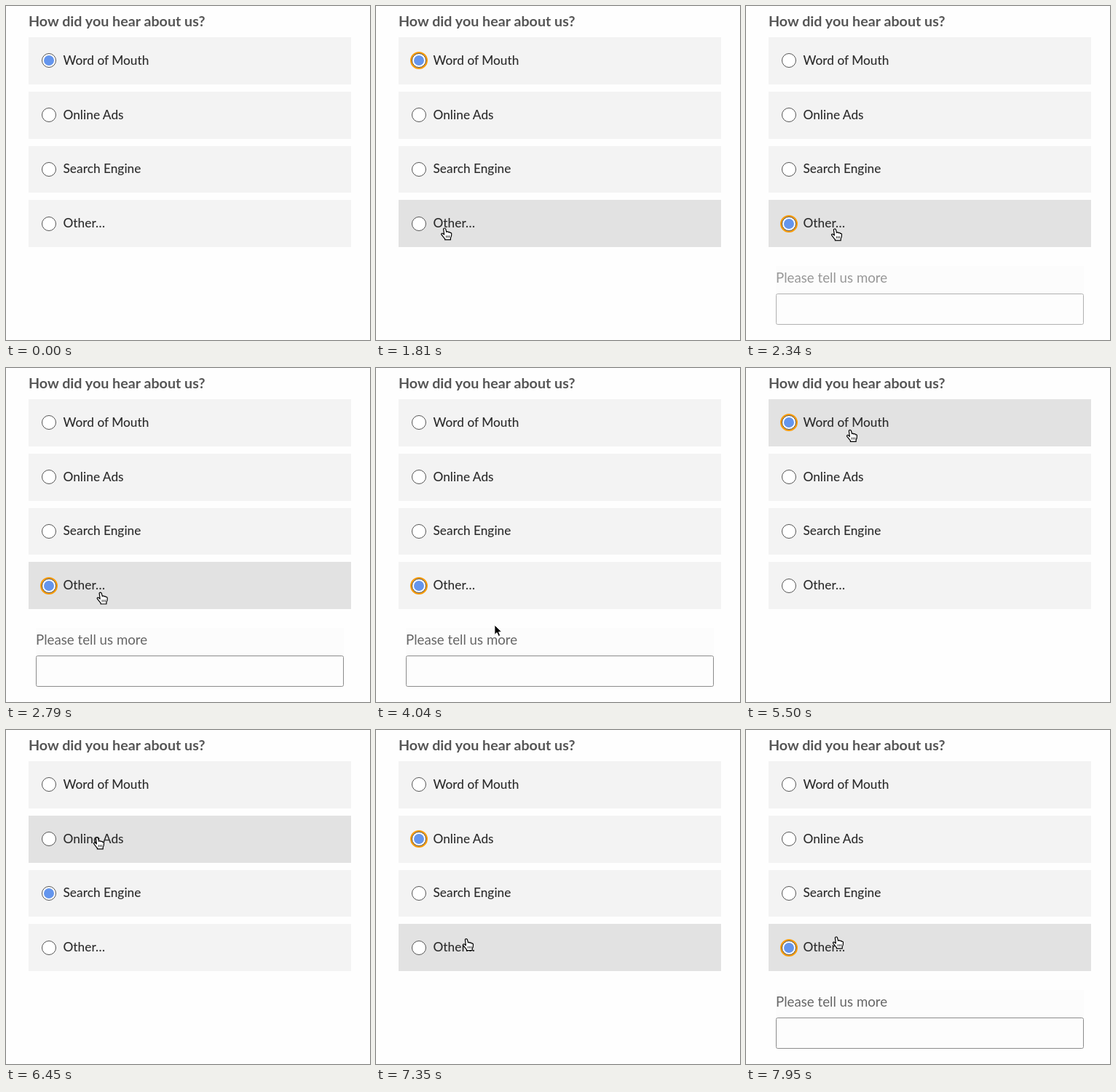
An HTML page that plays this animation: 500 px wide and 460 px high, repeating every 8000 ms.

```html
<!DOCTYPE html>
<html lang="en">
<head>
<meta charset="utf-8">
<title>Survey question</title>
<style>
  html, body { margin: 0; width: 100%; height: 100%; overflow: hidden; background: #fefefe; }
  svg { display: block; width: 500px; height: 460px; font-family: Lato, "Open Sans", sans-serif; }
  .title { font-size: 19.7px; font-weight: 700; fill: #555; }
  .option { font-size: 17.3px; font-weight: 500; fill: #2d2d2d; }
  .label { font-size: 18.7px; fill: #666; }
</style>
</head>
<body>
<svg viewBox="0 0 500 460">
  <text class="title" x="31" y="28">How did you hear about us?</text>
  <g id="options"></g>
  <g id="panel">
    <rect x="41" y="358" width="423" height="81" fill="#fcfcfc"/>
    <text class="label" x="41" y="381">Please tell us more</text>
    <rect x="41.5" y="396.5" width="422" height="42" rx="2" fill="#fdfdfd" stroke="#8c8c8c"/>
  </g>
  <g id="cursor" stroke-linejoin="round">
    <path id="arrow" d="M0 0V13.5L3.2 10.6 5.4 15.6 7.8 14.6 5.7 9.8H10Z" fill="#000" stroke="#fff"/>
    <g id="hand" stroke="#000" stroke-width="1.2" transform="translate(0 -.7)">
      <path fill="#fff" d="M-1.6 1.8C-1.4 .4 1 .2 1.5 1.8L2.6 6C3.2 5 5 5.2 5.2 6.4 6 5.6 7.4 6 7.6 7.2 8.6 6.6 9.6 7.4 9.5 8.6 9.6 11 9 13 8.2 14.2V16.6H.4V15.2C-1.4 13.6-2.8 11-4.4 9.4-5 8.2-3.4 7.2-2.2 8.2L-.6 9.6Z"/>
      <path fill="none" stroke-width=".8" d="M2.4 10.8v3M4.5 10.8v3M6.6 10.8v3"/>
    </g>
  </g>
</svg>
<script>
const LOOP = 8000, ENTER = 500;
const LEFT = 31, RIGHT = 474, PITCH = 74.7;
const WORD = 0, ADS = 1, SEARCH = 2, OTHER = 3;

// Pressing clears the focus ring; releasing selects the option.
const clicks = [
  { press: 0, release: 0, option: WORD, ring: false },
  { press: 1150, release: 1150, option: WORD, ring: true },
  { press: 2040, release: 2220, option: OTHER, ring: true },
  { press: 4550, release: 4780, option: WORD, ring: true },
  { press: 5860, release: 6040, option: SEARCH, ring: false },
  { press: 6750, release: 6750, option: ADS, ring: true },
  { press: 7590, release: 7770, option: OTHER, ring: true }
];

const origin = { x: 488, y: 281 };
const moves = [
  { from: ENTER, to: 850, x: 119, y: 320 },
  { from: 1150, to: 1390, x: 94, y: 306 },
  { from: 1810, to: 2040, x: 122, y: 307 },
  { from: 2600, to: 3020, x: 133, y: 310 },
  { from: 3080, to: 3440, x: 163, y: 355 },
  { from: 4040, to: 4550, x: 145, y: 69 },
  { from: 5490, to: 5680, x: 127, y: 215 },
  { from: 6220, to: 6450, x: 125, y: 148 },
  { from: 6800, to: 7410, x: 124, y: 289 },
  { from: 7770, to: 7950, x: 124, y: 285 }
];

const byId = id => document.getElementById(id);
const clamp = v => Math.max(0, Math.min(1, v));
const easeOut = p => 1 - (1 - p) ** 2;
const setOpacity = (el, value) => el.setAttribute('opacity', value);

function add(parent, tag, attrs, text = '') {
  const el = document.createElementNS('http://www.w3.org/2000/svg', tag);
  for (const [name, value] of Object.entries(attrs)) el.setAttribute(name, value);
  el.textContent = text;
  return parent.appendChild(el);
}

const rows = ['Word of Mouth', 'Online Ads', 'Search Engine', 'Other…'].map((text, i) => {
  const group = byId('options');
  const top = Math.round(43.3 + PITCH * i), bottom = Math.round(107.9 + PITCH * i);
  const box = { x: LEFT, y: top, width: RIGHT - LEFT, height: bottom - top };
  const center = { cx: 59, cy: 75 * (i + 1) };
  add(group, 'rect', { ...box, fill: '#f3f3f3' });
  const hover = add(group, 'rect', { ...box, fill: '#e2e2e2' });
  const ring = add(group, 'circle', { ...center, r: 10.7, fill: 'none', stroke: '#f99d0c', 'stroke-width': 2.6 });
  add(group, 'circle', { ...center, r: 9.5, fill: '#fff', stroke: '#555' });
  const dot = add(group, 'circle', { ...center, r: 7, fill: '#6495ed' });
  add(group, 'text', { class: 'option', x: 78.5, y: Math.round(81 + PITCH * i) }, text);
  return { top, bottom, hover, ring, dot };
});

function cursorAt(t) {
  return moves.reduce((pos, { from, to, x, y }) => {
    const p = easeOut(clamp((t - from) / (to - from)));
    return { x: pos.x + (x - pos.x) * p, y: pos.y + (y - pos.y) * p };
  }, origin);
}

function isOver({ top, bottom }, { x, y }) {
  return x >= LEFT && x < RIGHT && y >= top && y < bottom;
}

function render(now) {
  const t = now % LOOP;
  const pos = cursorAt(t);
  const last = clicks.findLastIndex(c => c.release <= t);
  const current = clicks[last];
  const focused = current.ring && !(clicks[last + 1]?.press <= t);

  // Averaging the recent past gives each row a 150 ms hover fade.
  const trail = Array.from({ length: 10 }, (_, k) => cursorAt(t - 15 * k));
  rows.forEach((row, i) => {
    const selected = i === current.option;
    setOpacity(row.hover, trail.filter(p => isOver(row, p)).length / trail.length);
    setOpacity(row.dot, +selected);
    setOpacity(row.ring, +(selected && focused));
  });

  const age = t - current.release;
  const closing = clicks[last - 1]?.option === OTHER ? 1 - clamp(age / 120) : 0;
  setOpacity(byId('panel'), current.option === OTHER ? clamp(age / 180) : closing);

  const pointing = rows.some(row => isOver(row, pos));
  setOpacity(byId('cursor'), +(t >= ENTER));
  setOpacity(byId('hand'), +pointing);
  setOpacity(byId('arrow'), +!pointing);
  byId('cursor').setAttribute('transform', `translate(${pos.x} ${pos.y})`);
  requestAnimationFrame(render);
}
requestAnimationFrame(render);
</script>
</body>
</html>
```
